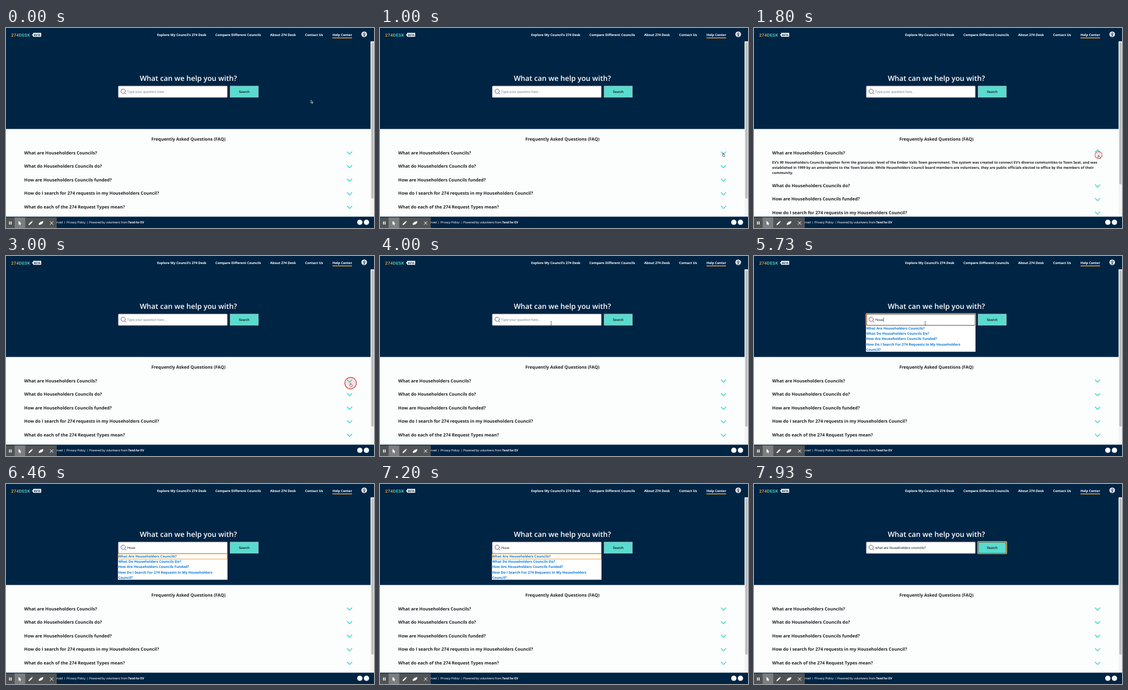
Recreate the animation shown at these times as an HTML page. Size 638 by 348 pixels, loop 8000 ms.

```html
<!DOCTYPE html>
<html lang="en">
<head>
<meta charset="utf-8">
<title>Help Center</title>
<style>
  html, body { margin: 0; height: 100%; overflow: hidden; background: #fcfdfd; }
  svg { display: block; width: 100vw; height: 100vh; text-rendering: geometricPrecision; }
  text { font: 700 7.6px "Open Sans", sans-serif; fill: #202124; white-space: pre; }
  .nav text { font-size: 5.77px; fill: #fff; }
  .title { font-weight: 600; font-size: 12.55px; fill: #fff; }
  .answer text { font-size: 6.07px; }
  .list text { font-size: 6.08px; fill: #0f7dd6; }
  .ui text { font: 400 6.05px Roboto, sans-serif; }
  .foot text { font: 400 5.35px Roboto, sans-serif; fill: #fff; }
  .logo { font: 500 7.4px Roboto, sans-serif; letter-spacing: .3px; }
  .line { fill: none; stroke-linecap: round; stroke-linejoin: round; }
</style>
</head>
<body>
<svg id="stage" viewBox="0 0 638 348" preserveAspectRatio="none"></svg>
<script>
const NAVY = '#002444', TEAL = '#58dccf', GOLD = '#f0a23c';
const LOOP = 8000, SHIFT = 33.6;
const CLICKS = [1330, 2730, 4000];
const OPEN = 1570, CLOSE = 2930, FOCUS = 4200, TAB = 6400, PICK = 7430, BUTTON = 7660;
const KEYS = [5060, 5240, 5420, 5600], TYPED = 'Hous';

const text = (x, y, s, more = '') => `<text x="${x}" y="${y}" ${more}>${s}</text>`;
const rect = (x, y, w, h, fill, more = '') =>
  `<rect x="${x}" y="${y}" width="${w}" height="${h}" fill="${fill}" ${more}/>`;
const circle = (x, y, r, fill) => `<circle cx="${x}" cy="${y}" r="${r}" fill="${fill}"/>`;
const path = (d, stroke, width, more = '') =>
  `<path class="line" d="${d}" stroke="${stroke}" stroke-width="${width}" ${more}/>`;

const questions = [
  'What are Householders Councils?',
  'What do Householders Councils do?',
  'How are Householders Councils funded?',
  'How do I search for 274 requests in my Householders Council?',
  'What do each of the 274 Request Types mean?'
];
const answer = [
  'EV’s 99 Householders Councils together form the grassroots level of the Ember Valis Town government. The system was created to connect EV’s diverse communities to Town Seat, and was',
  'established in 1999 by an amendment to the Town Statute. While Householders Council board members are volunteers, they are public officials elected to office by the members of their',
  'community.'
];
const hints = [
  'What Are Householders Councils?',
  'What Do Householders Councils Do?',
  'How Are Householders Councils Funded?',
  'How Do I Search For 274 Requests In My Householders',
  'Council?'
];
const nav = [[262, 'Explore My Council’s 274 Desk'], [363, 'Compare Different Councils'],
  [458, 'About 274 Desk'], [518.5, 'Contact Us'], [566, 'Help Center']];

const row = (q, i) => text(31.6, 219.6 + i * 23.55, q) +
  path(`M591.7 ${215.7 + i * 23.6}l3.9 3.9 3.9-3.9`, TEAL, 1.7, i ? '' : 'id="chevron"');

const header = rect(0, 0, 638, 23.5, NAVY) +
  `<text class="logo" x="9" y="14.6" style="fill:#f5b335">274<tspan fill="${TEAL}">DESK</tspan></text>` +
  '<path d="M44.6 12l2.4-1.6V8.6h14v6.6H47v-1.6z" fill="#fff"/>' +
  text(54, 13.8, 'BETA', `text-anchor="middle" style="font-size:4.8px;fill:${NAVY}"`) +
  `<g class="nav">${nav.map(([x, s]) => text(x, 14.2, s)).join('')}</g>` +
  rect(566, 16.6, 34, 1.4, GOLD) +
  circle(621, 11, 4.8, '#fff') + circle(621, 8.4, .9, NAVY) +
  path('M618.4 10.2l2.6.5 2.6-.5M621 10.7v1.5l-1.2 2.4M621 12.2l1.2 2.4', NAVY, .9);

const hero = rect(0, 23, 632, 152.7, NAVY) +
  text(316.2, 92, 'What can we help you with?', 'class="title" text-anchor="middle"');

const search = '<g class="ui">' +
  rect(194.8, 101, 188.8, 19.8, '#fff', 'rx="1" stroke="#b9b3bd" stroke-width=".8"') +
  rect(194.2, 100.3, 190, 21, 'none', `id="inputRing" rx="1" stroke="${GOLD}" stroke-width="1.5"`) +
  rect(195.2, 101.3, 188, 19, 'none', 'id="inputEdge" stroke="#3b3230" stroke-width=".6"') +
  '<circle class="line" cx="203" cy="110" r="3.7" stroke="#675d72" stroke-width=".9"/>' +
  path('M205.7 112.7l2.4 2.4', '#675d72', 1) +
  text(210, 113, '', 'id="entry"') +
  rect(0, 107, .6, 7.6, '#222', 'id="caret"') +
  rect(388.6, 101, 48.8, 19.6, TEAL, 'stroke="#9fb4ba" stroke-width=".8"') +
  `<g id="buttonRing">${rect(387.9, 100.3, 50.2, 21, 'none', `rx="1" stroke="${GOLD}" stroke-width="1.4"`)}` +
  rect(389, 101.3, 48, 19, 'none', 'stroke="#3b3230" stroke-width=".6"') + '</g>' +
  text(412.9, 113, 'Search', 'text-anchor="middle" style="font-weight:500;font-size:5.95px"') + '</g>';

const list = '<g class="list" id="list">' + rect(194, 121.2, 190, 45.4, '#fff') +
  hints.map((s, i) => text(194.4, 128.2 + i * 9.1, s)).join('') +
  rect(194.4, 121.6, 189.2, 9, 'none', `id="hintRing" stroke="${GOLD}" stroke-width="1"`) + '</g>';

const faq = text(316.2, 196, 'Frequently Asked Questions (FAQ)', 'text-anchor="middle"') +
  row(questions[0], 0) +
  `<g class="answer" id="answer">${answer.map((s, i) => text(31.6, 235.6 + i * 9.2, s)).join('')}</g>` +
  `<g id="rest">${questions.slice(1).map((q, i) => row(q, i + 1)).join('')}</g>`;

const scrollbar = rect(632, 23.5, 6, 305, '#f4f4f4') + rect(633.3, 25, 4, 272, '#bcbcbc', 'id="thumb" rx="2"');

const footer = rect(0, 328.3, 638, 20, NAVY) + '<g class="foot">' +
  text(98.3, 339.9, 'Reserved', 'text-anchor="end"') + text(100.8, 339.9, '|') +
  text(105, 339.9, 'Privacy Policy') + text(140.4, 339.9, '|') +
  text(144.2, 339.9, 'Powered by volunteers from') +
  text(211.5, 339.9, 'Tend for EV', 'style="font-weight:700"') + '</g>' +
  circle(613.4, 338, 4.6, '#fff') + circle(624.9, 338, 4.6, '#fff');

const toolbar = rect(0, 329.6, 88, 19, '#505355') + rect(15, 329.6, 18.4, 19, '#7b7e80') +
  rect(5.4, 336.6, 1.5, 5.4, '#fff') + rect(8.2, 336.6, 1.5, 5.4, '#fff') +
  '<g fill="#fff"><path d="M21.8 335.4v7l1.6-1.4 1.1 2.5 1.2-.6-1.1-2.4h2.1z"/>' +
  '<path d="M39 343l.5-2 4.4-4.4 1.6 1.6-4.4 4.3zM44.4 336.1l.7-.6 1.6 1.5-.7.7z"/>' +
  '<path d="M57 340.2l2.6-2.8 5-1.6-.4 3.4-3 2.6-4.4 1z"/></g>' +
  path('M76.6 336.9l5 5M81.6 336.9l-5 5', '#fff', 1);

const pointers = '<circle id="ring" fill="#e0484820" stroke="#dc5058" stroke-width="1.4"/><g id="pointer">' +
  '<path id="arrow" d="M0 0v5l1.2-1 .8 1.8 .9-.4-.8-1.7h1.5z" fill="#222" stroke="#fff" stroke-width=".6"/>' +
  '<path id="hand" d="M-.6-.6q.6-.6 1 0v2l2.3.6q.5.3.2 1.4l-.5 1.8h-2.5l-1.7-2.4q.1-.7 1.2 0z" fill="#fff" stroke="#222" stroke-width=".6"/>' +
  path('M-1-3q1 0 1 .7V2.3Q0 3-1 3M1-3q-1 0-1 .7M1 3Q0 3 0 2.3', '#333', .6, 'id="beam"') + '</g>';

stage.innerHTML = rect(0, 0, 638, 348, '#fcfdfd') + faq + hero + header + search + list +
  scrollbar + footer + toolbar + pointers;

const $ = id => document.getElementById(id);
const show = (id, on) => $(id).setAttribute('visibility', on ? 'inherit' : 'hidden');
const clamp = v => Math.max(0, Math.min(1, v));
const ease = (t, a, b) => { const p = clamp((t - a) / (b - a)); return p * p * (3 - 2 * p); };

function drawPointer(t) {
  const go = ease(t, 60, 1120), back = ease(t, 3300, 3950);
  const x = 528.8 + 68.6 * go - 300.6 * back;
  const y = 125.6 + 96.4 * go - 105 * back;
  const overInput = back > 0 && x < 384 && y < 121;
  const overRow = x > 589 && y > 210;
  $('pointer').setAttribute('transform', `translate(${x} ${y})`);
  show('pointer', t < TAB);
  show('beam', overInput);
  show('hand', overRow);
  show('arrow', !overInput && !overRow);

  // A click ring swells, holds, then shrinks away.
  const start = CLICKS.find(c => t >= c && t < c + 720);
  show('ring', start !== undefined);
  if (start === undefined) return;
  const age = t - start, fade = 1 - ease(age, 290, 720);
  const ring = $('ring');
  ring.setAttribute('cx', x);
  ring.setAttribute('cy', y - .8);
  ring.setAttribute('r', 10 * ease(age, 0, 200) * fade);
  ring.setAttribute('opacity', .35 + .65 * fade);
}

function drawFaq(t) {
  const open = t >= OPEN && t < CLOSE;
  show('answer', open);
  $('rest').setAttribute('transform', `translate(0 ${open ? SHIFT : 0})`);
  $('chevron').setAttribute('transform', open ? 'translate(0 431.6) scale(1 -1)' : '');
  $('thumb').setAttribute('height', open ? 247 : 272);
}

function drawSearch(t) {
  const focused = t >= FOCUS && t < TAB;
  const count = KEYS.filter(k => t >= k).length;
  const value = t >= PICK ? 'what are householders councils?' : TYPED.slice(0, count);
  const entry = $('entry');
  entry.textContent = value || 'Type your question here...';
  entry.style.fill = value ? '#222' : '#85858b';
  show('inputRing', focused);
  show('inputEdge', focused);
  const lastKey = count ? KEYS[count - 1] : FOCUS;
  show('caret', focused && (t - lastKey) % 1000 < 500);
  $('caret').setAttribute('x', 210.3 + (value ? entry.getComputedTextLength() : 0));
  show('list', count > 0 && t < PICK);
  show('hintRing', t >= TAB && t < PICK);
  show('buttonRing', t >= BUTTON);
}

const begin = performance.now();
function frame() {
  const t = (performance.now() - begin) % LOOP;
  drawFaq(t);
  drawSearch(t);
  drawPointer(t);
  requestAnimationFrame(frame);
}
frame();
</script>
</body>
</html>
```
